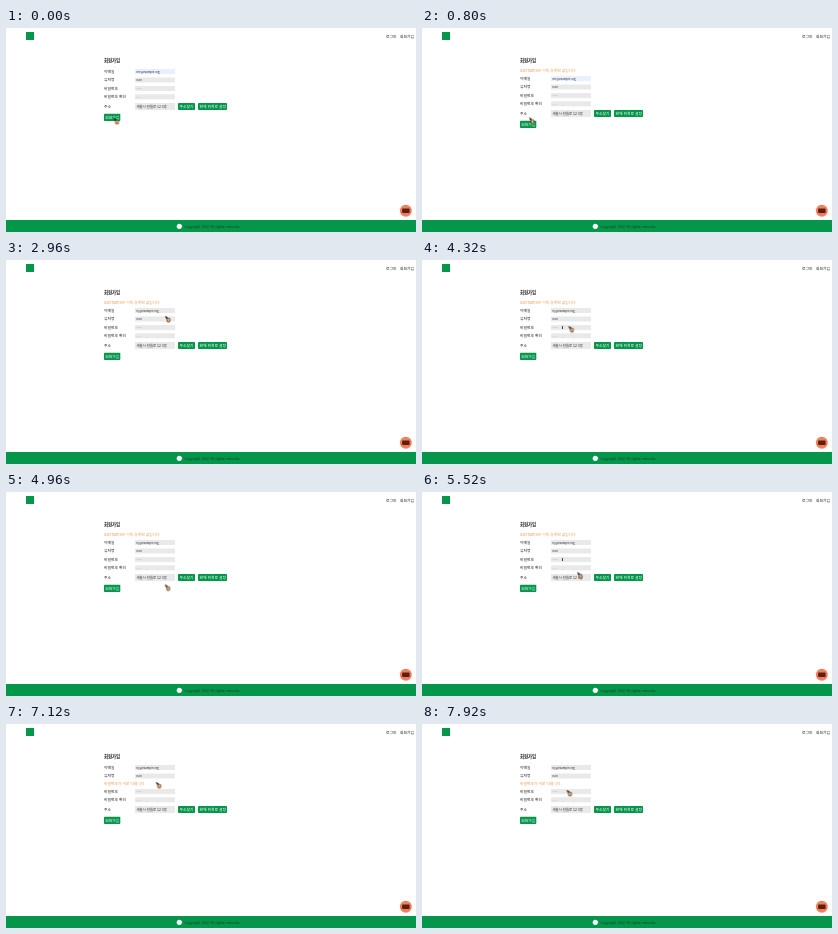
Recreate the animation shown at these times as an HTML page. Size 410 px wide and 204 px high, loop 8000 ms.

```html
<!DOCTYPE html>
<html lang="ko">
<head>
<meta charset="utf-8">
<title>회원가입</title>
<style>
html, body { margin: 0; width: 100%; height: 100%; overflow: hidden; background: #fff; }
svg { display: block; width: 410px; height: 204px; }
text { font: 3.8px "Noto Sans CJK KR", "Noto Sans CJK", sans-serif; fill: #222; }
.title { font-size: 4.35px; font-weight: 700; fill: #111; }
.small { font-size: 3.4px; }
.mail { font-size: 2.8px; }
.dots { font-size: 2.4px; fill: #999; }
.field { fill: #e9e9e9; }
.green { fill: #05964c; }
.on { fill: #fff; font-weight: 500; }
.error { fill: #ee9c55; }

.top, .rest, .first, .second, .old, .new, .mark, .caret, #cursor { animation: 8s infinite step-end; }
.top { animation-name: top; }
.rest { animation-name: rest; }
.first { animation-name: first; }
.second { animation-name: second; }
.old { animation-name: old; }
.new { animation-name: new; }
.mark { animation-name: mark; }
.caret { animation-name: caret; }
#cursor { animation-name: move; animation-timing-function: linear; }

@keyframes top { 0%, 78% { transform: none } 5% { transform: translateY(7px) } 100% { transform: none } }
@keyframes rest { 0% { transform: none } 5%, 100% { transform: translateY(7px) } }
@keyframes first { 0%, 78%, 100% { opacity: 0 } 5% { opacity: 1 } }
@keyframes second { 0% { opacity: 0 } 78%, 100% { opacity: 1 } }
@keyframes old { 0% { opacity: 1 } 32%, 100% { opacity: 0 } }
@keyframes new { 0% { opacity: 0 } 32%, 100% { opacity: 1 } }
@keyframes mark { 0%, 32%, 100% { opacity: 0 } 29% { opacity: .45 } }
@keyframes caret { 0%, 60%, 74%, 100% { opacity: 0 } 52%, 67% { opacity: 1 } }
@keyframes move {
  0% { transform: translate(107.5px, 90px) }
  2%, 10% { transform: translate(107px, 89.5px) }
  12.5% { transform: translate(104px, 91px) }
  16% { transform: translate(128px, 41px) }
  20%, 21% { transform: translate(151.5px, 49px) }
  23%, 26% { transform: translate(151px, 49px) }
  30%, 32% { transform: translate(137px, 49.5px) }
  37% { transform: translate(159px, 56px) }
  42%, 43% { transform: translate(146.5px, 64px) }
  45%, 47% { transform: translate(146px, 65px) }
  52%, 54% { transform: translate(146.5px, 66px) }
  58% { transform: translate(111px, 92px) }
  62% { transform: translate(158.5px, 92.5px) }
  64% { transform: translate(198px, 85px) }
  66% { transform: translate(198px, 67px) }
  72%, 82% { transform: translate(112.5px, 93.5px) }
  86% { transform: translate(154.5px, 50px) }
  92% { transform: translate(145px, 66px) }
  96%, 98% { transform: translate(144px, 67px) }
  99%, 100% { transform: translate(144.5px, 66px) }
}
</style>
</head>
<body>
<svg viewBox="0 0 410 204">
  <rect class="green" x="20" y="4" width="8" height="8"/>
  <text x="380" y="10">로그인</text>
  <text x="394" y="10">회원가입</text>
  <text class="title" x="98" y="33.6">회원가입</text>

  <text class="error first" x="98" y="44">username은 이미 등록된 값입니다</text>
  <text class="error second" x="98" y="61">비밀번호가 서로 다릅니다.</text>

  <g class="top">
    <text x="98" y="45">이메일</text>
    <rect class="field" x="129" y="41" width="40" height="5"/>
    <g class="old">
      <rect x="129" y="41" width="40" height="5" fill="#e8f0fe"/>
      <text class="mail" x="130.5" y="44.5">me@example.org</text>
    </g>
    <text class="mail new" x="130.5" y="44.5">ny@example.org</text>
    <rect class="mark" x="137" y="42" width="14" height="3.4" fill="#3390ff"/>
    <text x="98" y="53.4">유저명</text>
    <rect class="field" x="129" y="49.5" width="40" height="5"/>
    <text class="mail" x="130.5" y="53">nari</text>
  </g>

  <g class="rest">
    <text x="98" y="62">비밀번호</text>
    <rect class="field" x="129" y="58" width="40" height="5"/>
    <text class="dots" x="130.5" y="61.4">••••••</text>
    <rect class="caret" x="140" y="59" width=".7" height="3"/>
    <text x="98" y="70.3">비밀번호 확인</text>
    <rect class="field" x="129" y="66.3" width="40" height="5"/>
    <text class="dots" x="130.5" y="69.7" opacity=".6">••••••</text>
    <text x="98" y="79.8">주소</text>
    <rect class="field" x="129" y="75" width="40" height="7"/>
    <text class="small" x="130.5" y="79.7">새솔시 한들로 12 3층</text>
    <rect class="green" x="172" y="75" width="17" height="7" rx=".8"/>
    <text class="on" x="173.5" y="79.9">주소찾기</text>
    <rect class="green" x="192" y="75" width="29" height="7" rx=".8"/>
    <text class="on" x="193.5" y="79.9">현재 위치로 설정</text>
    <rect class="green" x="98" y="85.7" width="16.3" height="7.3" rx=".8"/>
    <text class="on" x="99.2" y="90.7">회원가입</text>
  </g>

  <rect class="green" y="192" width="410" height="12"/>
  <circle cx="173.3" cy="198.3" r="2.6" fill="#fff"/>
  <text class="small" x="178.5" y="199.5" fill-opacity=".75">Copyright 2022. All rights reserved.</text>
  <circle cx="399.8" cy="182.7" r="6" fill="#f0805a"/>
  <rect x="396" y="180.5" width="7.6" height="4.4" rx="1" fill="#5a2018"/>

  <g id="cursor">
    <rect x="2" y="2.2" width="3" height="3.8" rx="1" fill="#f0b070" stroke="#4a3020" stroke-width=".7"/>
    <path d="M0 0L3.2 1.2 2.1 1.9 1.3 3.2Z" fill="#222"/>
  </g>
</svg>
</body>
</html>
```
